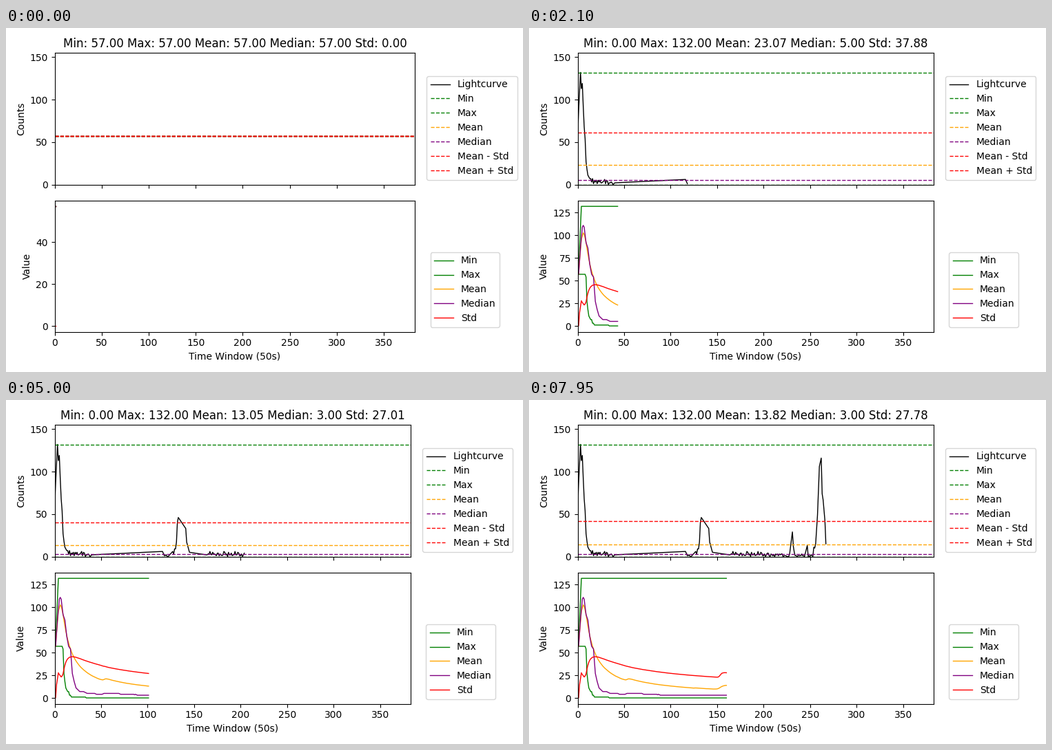
These frames come from a looping animation (750 px wide and 500 px high, 8000 ms). A matplotlib script:

```python
import numpy as np
import matplotlib.pyplot as plt
from matplotlib.animation import FuncAnimation

W, H, DPI = 750, 500, 100
rng = np.random.default_rng(4)
times, counts = [], []


def add(start, values):
    times.extend(range(start, start + len(values)))
    counts.extend(values)


def flare(*knots):
    """Counts that run straight from knot to knot, given as (window, count)."""
    t, y = zip(*knots)
    add(t[0], np.rint(np.interp(range(t[0], t[-1] + 1), t, y)))


def quiet(start, size, total):
    """Background noise that spreads `total` counts over `size` windows."""
    add(start, rng.multinomial(total, np.full(size, 1 / size)))


flare((0, 57), (1, 86), (2, 109), (3, 132), (4, 113), (5, 119), (6, 92),
      (7, 68), (8, 54), (9, 27), (10, 18), (11, 11), (13, 7))
quiet(14, 14, 51)
quiet(28, 13, 32)
flare((116, 6))
quiet(118, 5, 4)
flare((127, 6), (128, 3), (129, 9), (130, 9), (131, 17), (132, 40), (133, 46))
flare((141, 33), (142, 17), (145, 5))
quiet(163, 26, 75)
quiet(189, 32, 74)
quiet(221, 8, 6)
flare((231, 29), (232, 12), (233, 5))
quiet(234, 11, 11)
flare((247, 13))
quiet(248, 6, 4)
flare((254, 11), (255, 10), (256, 15), (258, 49), (260, 106), (262, 116),
      (263, 74), (264, 67), (266, 42), (267, 15))

N = len(counts)
STATS = {"Min": np.min, "Max": np.max, "Mean": np.mean,
         "Median": np.median, "Std": np.std}
COLORS = {"Min": "green", "Max": "green", "Mean": "orange",
          "Median": "purple", "Std": "red"}

# running statistics; the first value stands at both 0 and 1
history = {}
for name, fn in STATS.items():
    run = [fn(counts[:n]) for n in range(1, N + 1)]
    history[name] = np.array(run[:1] + run)

fig, (top, low) = plt.subplots(2, 1, sharex=True,
                               figsize=(W / DPI, H / DPI), dpi=DPI)

top.set_xlim(0, 383)
top.set_ylim(0, 154.9)
top.set_ylabel("Counts")
low.set_ylabel("Value")
low.set_xlabel("Time Window (50s)")
title = top.set_title("")

curve, = top.plot([], [], color="black", lw=1, label="Lightcurve")


def level(label, color):
    return top.axhline(0, color=color, ls="--", lw=1, label=label)


levels = {name: level(name, COLORS[name])
          for name in ("Min", "Max", "Mean", "Median")}
levels["Mean - Std"] = level("Mean - Std", "red")
levels["Mean + Std"] = level("Mean + Std", "red")

traces = {name: low.plot([], [], color=c, lw=1, label=name)[0]
          for name, c in COLORS.items()}

top.legend(loc="lower left", bbox_to_anchor=(1.0195, 0))
low.legend(loc="lower left", bbox_to_anchor=(1.0295, 0))


def place(right, left=70.6, height=191.2):
    for ax, bottom in ((top, 227.53), (low, 441.72)):
        ax.set_position([left / W, (H - bottom) / H,
                         (right - left) / W, height / H])


def update(i):
    n = i + 1
    place(593.2 if i == 0 else 587.1)
    now = {name: h[n] for name, h in history.items()}
    title.set_text(" ".join(f"{name}: {v:.2f}" for name, v in now.items()))

    curve.set_data(times[:n], counts[:n])
    now["Mean - Std"] = now["Mean"] - now["Std"]
    now["Mean + Std"] = now["Mean"] + now["Std"]
    for name, line in levels.items():
        line.set_ydata([now[name]] * 2)

    for name, line in traces.items():
        line.set_data(np.arange(n + 1), history[name][:n + 1])
    pad = 0.05 * now["Max"]
    low.set_ylim(-pad, now["Max"] + pad)
    return []


anim = FuncAnimation(fig, update, frames=N, interval=50,
                     init_func=lambda: update(0), repeat=True,
                     repeat_delay=0, blit=False)
plt.show()
```
